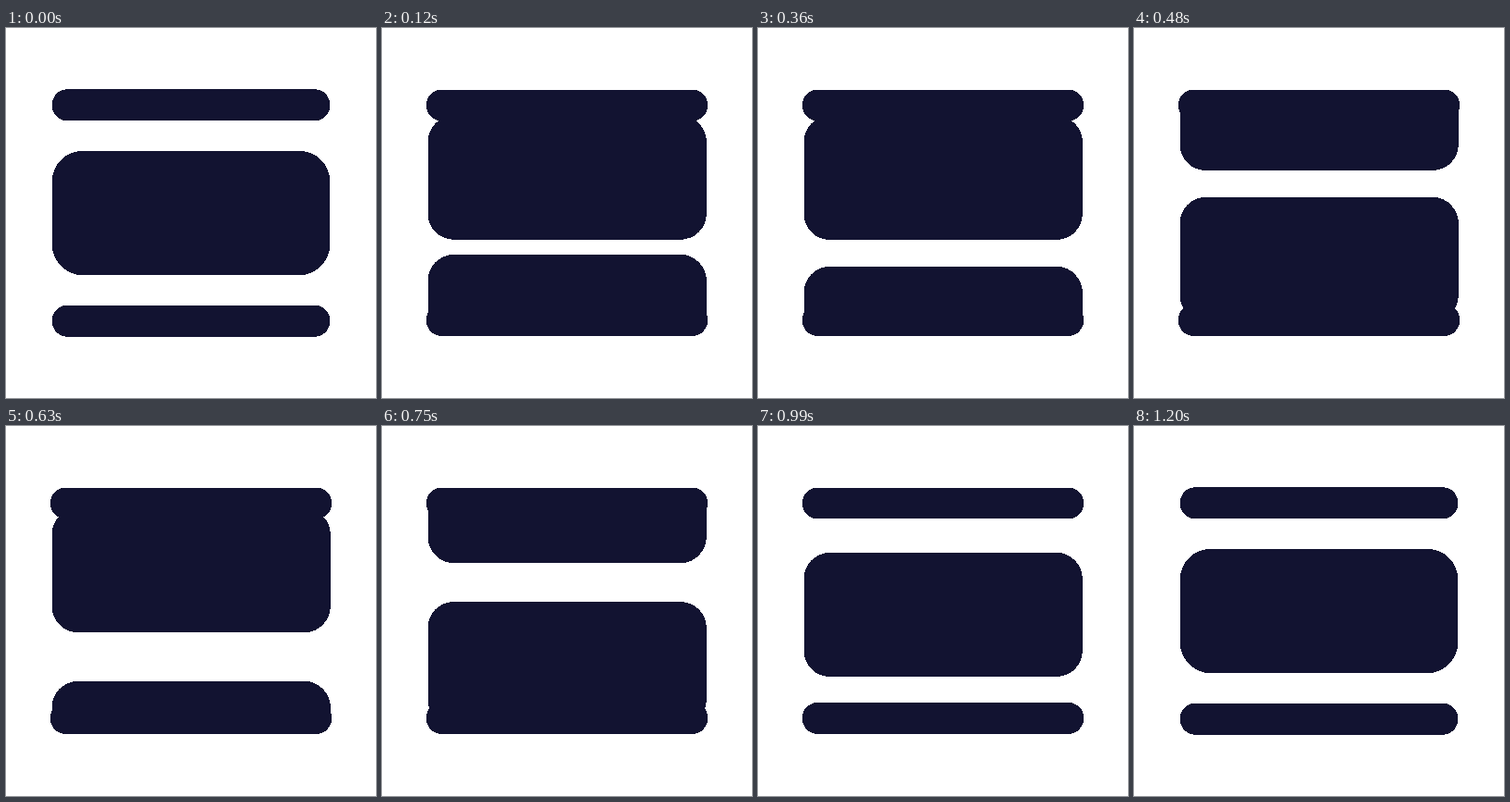
Animation, 400 px wide and 400 px high, one loop 3230 ms. Source, as an HTML page with a canvas:

```html
<!DOCTYPE html>
<html lang="en">
<head>
<meta charset="utf-8">
<title>Scrolling cards</title>
<style>
  html, body { margin: 0; width: 100%; height: 100%; overflow: hidden; background: #fff; }
  canvas { display: block; width: 100vw; height: 100vh; }
</style>
</head>
<body>
<canvas id="stage" width="400" height="400"></canvas>
<script>
const SIZE = 400;
const ctx = document.getElementById('stage').getContext('2d', { willReadFrequently: true });
const LOOP = 3230, STEP = 30, LAST = 40;
const UNIT = SIZE / 24;
const TRAVEL = 10 * UNIT;   // from centre to fully behind a bar
const REST = 8 * UNIT;
const CARD_H = 8 * UNIT;

function bezier(x1, y1, x2, y2) {
  const at = (a, b, t) => 3 * a * t * (1 - t) ** 2 + 3 * b * t * t * (1 - t) + t ** 3;
  return x => {
    if (x <= 0) return 0;
    if (x >= 1) return 1;
    let lo = 0, hi = 1;
    for (let i = 0; i < 30; i++) {
      const mid = (lo + hi) / 2;
      if (at(x1, x2, mid) < x) lo = mid; else hi = mid;
    }
    return at(y1, y2, lo);
  };
}

const linear = x => Math.min(1, Math.max(0, x));
const easeIn = bezier(0.333, 0, 0.833, 0.833);
const easeOut = bezier(0.167, 0.167, 0.17, 1);

// Times are in steps, offsets are relative to the resting place.
const cards = [
  { start: 0, end: 10.6, from: 0, to: -TRAVEL, ease: easeIn },
  { start: 1.08, end: 18.86, from: TRAVEL, to: -TRAVEL, ease: linear },
  { start: 9.77, end: 27.55, from: TRAVEL, to: -TRAVEL, ease: linear },
  { start: 19.64, end: 36.95, from: TRAVEL, to: 0, ease: easeOut }
];

function box(x, y, w, h, r) {
  ctx.beginPath();
  ctx.roundRect(x, y, w, h, r);
  ctx.fill();
}

function drawIdle() {
  box(50, 4 * UNIT, 300, 2 * UNIT, UNIT);
  box(50, REST, 300, CARD_H, 2 * UNIT);
  box(50, 18 * UNIT, 300, 2 * UNIT, UNIT);
}

function drawScroll(step) {
  ctx.save();
  ctx.beginPath();
  ctx.rect(0, 5 * UNIT, SIZE, 14 * UNIT);
  ctx.clip();
  for (const c of cards) {
    const p = c.ease((step - c.start) / (c.end - c.start));
    if (step < c.start || (p === 1 && c.to !== 0)) continue;
    box(50, REST + c.from + (c.to - c.from) * p, 300.4, CARD_H, 28);
  }
  ctx.restore();
  box(48.2, 67, 303.6, 33, 16.5);
  box(48.2, 299.2, 303.6, 33.4, 16.7);
}

// Edges are hard: every touched pixel becomes fully opaque.
function harden() {
  const img = ctx.getImageData(0, 0, SIZE, SIZE);
  const px = new Uint32Array(img.data.buffer);
  const ink = 0xff311312;   // #121331 as ABGR
  for (let i = 0; i < px.length; i++) px[i] = px[i] >>> 24 > 12 ? ink : 0;
  ctx.putImageData(img, 0, 0);
}

let shown = -1;
function draw(ms) {
  const step = Math.min(LAST, Math.floor(ms / STEP));
  if (step === shown) return;
  shown = step;
  ctx.clearRect(0, 0, SIZE, SIZE);
  ctx.fillStyle = '#121331';
  if (step === 0 || step === LAST) drawIdle();
  else drawScroll(step);
  harden();
}

const t0 = performance.now();
function tick() {
  draw((performance.now() - t0) % LOOP);
  requestAnimationFrame(tick);
}
tick();
</script>
</body>
</html>
```
